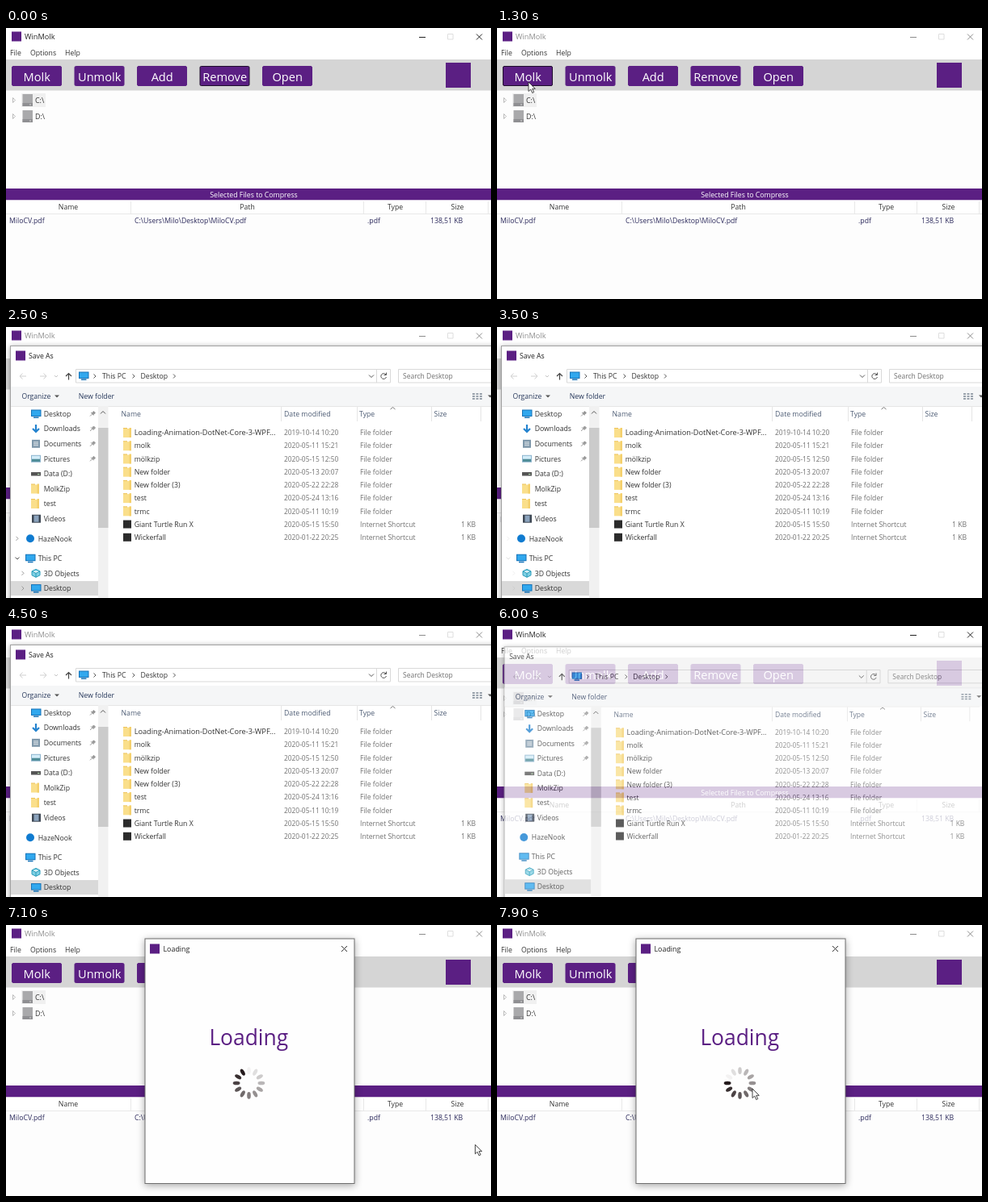
Recreate the animation shown at these times as an HTML page. Size 600 by 336 pixels, loop 8 s.

```html
<!DOCTYPE html>
<html lang="en">
<head>
<meta charset="utf-8">
<title>Save dialog</title>
<style>
html, body { margin: 0; width: 100%; height: 100%; overflow: hidden; background: #fff; }
svg { display: block; width: 600px; height: 336px; }
text { font-family: "Open Sans", "Noto Sans", sans-serif; white-space: pre; }
</style>
</head>
<body>
<svg id="stage" viewBox="0 0 600 336" xmlns="http://www.w3.org/2000/svg"></svg>
<script>
const LOOP = 8000;
const PURPLE = '#5b1f83';
const stage = document.getElementById('stage');

const rect = (x, y, w, h, fill, extra = '') =>
  `<rect x="${x}" y="${y}" width="${w}" height="${h}" fill="${fill}" ${extra}/>`;
const path = (d, stroke, width = 1, fill = 'none') =>
  `<path d="${d}" stroke="${stroke}" stroke-width="${width}" fill="${fill}"/>`;
const label = (x, y, s, size = 8.7, fill = '#333', extra = '') =>
  `<text x="${x}" y="${y}" font-size="${size}" fill="${fill}" ${extra}>${s}</text>`;
const centered = (x, y, s, size, fill) => label(x, y, s, size, fill, 'text-anchor="middle"');
const mark = (x, y) => rect(x, y, 12, 12, PURPLE);
const chevron = (x, y, color = '#555') => path(`M${x - 1.5} ${y - 2.5}l2.5 2.5l-2.5 2.5`, color);
const down = (x, y) => path(`M${x - 3} ${y - 1.5}h6l-3 3z`, 'none', 0, '#555');

function mainWindow() {
  const buttons = ['Molk', 'Unmolk', 'Add', 'Remove', 'Open'].map((name, i) => {
    const x = 7.5 + 77.5 * i;
    return rect(x, 47.5, 61, 24, PURPLE, `id="btn${name}" rx="1.5" stroke="${PURPLE}" stroke-width="1"`) +
      centered(x + 30.7, 66, name, 14.6, '#fff');
  }).join('');

  const drives = ['C:\\', 'D:\\'].map((name, i) => {
    const y = 89.5 + 20 * i;
    return path(`M8.5 ${y - 3}l3 3l-3 3z`, '#aaa', 0.8) +
      (i ? '' : rect(19, 81, 30, 17, '#f0f0f0')) +
      rect(20.5, y - 7.5, 12.5, 15, '#a9a9ab') + rect(20.5, y + 3.5, 12.5, 4, '#8f8f92') +
      rect(29, y + 5, 2, 1, '#d8d8d8') +
      label(36, y + 3.5, name, 8.9);
  }).join('');

  const heads = [[77, 'Name'], [298.5, 'Path'], [481.5, 'Type'], [558.5, 'Size']]
    .map(([x, s]) => centered(x, 225.3, s, 8.7, '#333')).join('');
  const cells = [[4, 'MiloCV.pdf'], [159, 'C:\\Users\\Milo\\Desktop\\MiloCV.pdf'], [447, '.pdf'], [525, '138,51 KB']]
    .map(([x, s]) => label(x, 241.5, s, 8.7, '#2c2a5c')).join('');

  return rect(0, 0, 600, 336, '#fdfdfd') + rect(0, 0, 600, 39, '#fff') +
    mark(7, 4.5) +
    `<g id="caption">${label(23, 14, 'WinMolk', 9.2, 'currentColor')}` +
    path('M511 11.5h8M582 7.5l7 7M589 7.5l-7 7', 'currentColor') + '</g>' +
    path('M546.5 7.5h6.5v6.5h-6.5z', '#dedede') +
    label(5, 34, 'File') + label(30, 34, 'Options') + label(73, 34, 'Help') +
    rect(0, 39, 600, 38.5, '#d5d5d5') + buttons +
    rect(544, 43, 31, 31, PURPLE) + drives +
    rect(0, 199, 600, 14.5, PURPLE) + centered(306.5, 210, 'Selected Files to Compress', 8.75, '#fff') +
    rect(0, 213.5, 600, 16.5, '#fff') +
    path('M0 230.5H600M154.5 215v15M442.5 215v15M519.5 215v15M596.5 215v15', '#e8e8e8') +
    heads + cells;
}

const folder = (x, y) =>
  rect(x, y - 6, 5, 3, '#eec35a') + rect(x, y - 5, 10, 11, '#fadf8b') + rect(x + 7.5, y - 6, 2.5, 12, '#f4d06d');
const screen = (x, y) =>
  rect(x, y - 5, 12.5, 8.5, '#1673b8') + rect(x + 1, y - 4, 10.5, 6.5, '#31a8ee') + rect(x + 3, y + 4, 6.5, 1.5, '#1673b8');
const disk = (x, y) => rect(x, y - 2, 12, 4.5, '#555') + rect(x + 8, y, 2.5, 1, '#b9e6b5');
const arrowDown = (x, y) => path(`M${x + 6} ${y - 5}v8M${x + 2} ${y}l4 4l4 -4`, '#2483cf', 2.2);
const sheet = (x, y) => rect(x + 1, y - 5, 10, 10, '#7e97aa') + path(`M${x + 3} ${y - 2}h6M${x + 3} ${y}h6M${x + 3} ${y + 2}h6`, '#fff', 0.8);
const picture = (x, y) => rect(x, y - 4.5, 12, 9, '#8db4ce') + rect(x + 1, y - 3.5, 10, 4, '#d3edf9') + rect(x + 1, y + 0.5, 10, 3, '#4d8c96');
const film = (x, y) => rect(x + 1, y - 5, 11, 10, '#3d4753') + rect(x + 3.5, y - 4, 6, 8, '#8ba3bd');
const cube = (x, y) => path(`M${x + 6} ${y - 5}l5 2.5v5l-5 2.5l-5 -2.5v-5zM${x + 1} ${y - 2.5}l5 2.5l5 -2.5M${x + 6} ${y}v5`, '#2a9cba', 1, '#7fd0e4');
const dot = (x, y) => `<circle cx="${x + 6}" cy="${y}" r="5" fill="#0f7bd0"/>`;

function sidePane() {
  const rows = [
    ['Desktop', 107.5, screen], ['Downloads', 126, arrowDown], ['Documents', 144.8, sheet],
    ['Pictures', 163.3, picture], ['Data (D:)', 182, disk], ['MolkZip', 200.5, folder],
    ['test', 219, folder], ['Videos', 237.7, film], ['HazeNook', 262.3, dot, 24],
    ['This PC', 286.7, screen, 24], ['3D Objects', 305.3, cube], ['Desktop', 324, screen]
  ];
  const pins = [107.5, 126, 144.8, 163.3]
    .map(y => path(`M104 ${y + 3}l3 -3M105 ${y - 1.5}l3.5 3.5M106.5 ${y - 1}l2 -2l2 2l-2 2z`, '#999', 1, '#999')).join('');
  return rect(6, 315, 108, 18, '#d9d9d9') +
    rows.map(([s, y, icon, x = 31]) => icon(x, y) + label(x + 15.7, y + 3.2, s)).join('') + pins +
    rect(114, 98, 12.5, 238, '#f1f1f1') + rect(114, 125, 12.5, 124, '#cbcbcb') +
    path('M117 107.5l3 -3l3 3', '#555') +
    '<g id="expanders">' +
    chevron(14, 262.3, '#999') + path('M11.5 285.5l2.5 2.5l2.5 -2.5', '#555') +
    chevron(21, 305.3, '#999') + chevron(21, 324, '#999') + '</g>';
}

function fileList() {
  const rows = [
    ['Loading-Animation-DotNet-Core-3-WPF...', '2019-10-14 10:20'],
    ['molk', '2020-05-11 15:21'], ['mölkzip', '2020-05-15 12:50'],
    ['New folder', '2020-05-13 20:07'], ['New folder (3)', '2020-05-22 22:28'],
    ['test', '2020-05-24 13:16'], ['trmc', '2020-05-11 10:19'],
    ['Giant Turtle Run X', '2020-05-15 15:50'], ['Wickerfall', '2020-01-22 20:25']
  ];
  const heads = [[142.5, 'Name'], [344, 'Date modified'], [437, 'Type'], [529.5, 'Size']]
    .map(([x, s]) => label(x, 111.3, s, 8.7, '#4d5c74')).join('');
  return heads + path('M340.5 99v18M434.5 99v18M526.5 99v18M587.5 99v18', '#e5e5e5') +
    path('M475.5 102l3 -2.5l3 2.5', '#777') +
    rows.map(([name, date], i) => {
      const y = 131 + 16.22 * i, game = i > 6;
      return (game ? rect(145, y - 5, 10, 10, '#2b2b2b') : folder(145, y)) +
        label(158.7, y + 3.2, name, i ? 8.7 : 9.2) +
        label(344, y + 3.2, date, 8.4, '#707070') +
        label(438, y + 3.2, game ? 'Internet Shortcut' : 'File folder', 8.6, '#707070') +
        (game ? label(581, y + 3.2, '1 KB', 8.6, '#707070', 'text-anchor="end"') : '');
    }).join('');
}

function saveDialog() {
  return rect(5.5, 23.5, 640, 330, '#fff', 'stroke="#a2a2a2" style="filter:drop-shadow(0 1px 3px rgba(0,0,0,.35))"') +
    `<g id="dlgMark">${mark(12, 29.5)}</g>` + label(28, 39, 'Save As', 8.7, '#222', 'id="dlgTitle"') +
    path('M25 61h-8M20.5 57.5l-3.5 3.5l3.5 3.5M42 61h8M46.5 57.5l3.5 3.5l-3.5 3.5', '#d0d0d0') +
    path('M60 60l2 2l2 -2', '#c4c4c4') +
    path('M77.5 65.5v-8M74 61l3.5 -3.5l3.5 3.5', '#444', 1.2) +
    path('M86.5 52.5h389v16.5h-389zM458.5 52.5v16.5M485.5 52.5h140v16.5h-140z', '#d9d9d9') +
    screen(90, 60.5) + chevron(110, 61) + label(119, 64, 'This PC') + chevron(158, 61) +
    label(166.5, 64, 'Desktop') + chevron(208.5, 61) + path('M449 59.5l3 3l3 -3', '#555') +
    path('M470 59a3.4 3.4 0 1 0 .5 3M470.5 56.5v3h-3', '#555') +
    label(491, 64, 'Search Desktop', 8.5, '#707070') +
    rect(6, 74, 600, 24, '#f5f6f7') + path('M6 98.5H600', '#e6e6e6') +
    label(19.5, 89.3, 'Organize', 8.6, '#28395c') + down(63, 86) + label(89.7, 89.3, 'New folder', 8.7, '#28395c') +
    path('M577 83h3M577 86h3M577 89h3M581.5 83h3M581.5 86h3M581.5 89h3M586 83h3M586 86h3M586 89h3', '#7b8794', 1.5) +
    down(599, 86) + sidePane() + fileList();
}

function loadingDialog() {
  let dots = '';
  for (let i = 0; i < 12; i++)
    dots += `<ellipse class="dot" cx="300.5" cy="180.6" rx="2.3" ry="4.4" transform="rotate(${i * 30} 300.5 196)" fill="#251b1d"/>`;
  return rect(172, 17, 259, 303.5, '#fefefe', 'stroke="#6f6f6f" style="filter:drop-shadow(0 2px 5px rgba(0,0,0,.35))"') +
    mark(178, 23.5) + label(194.5, 33, 'Loading', 8.9, '#222') +
    path('M415 26l7 7M422 26l-7 7', '#333') +
    centered(300.3, 148.5, 'Loading', 26.4, PURPLE) + dots;
}

stage.innerHTML = `<g id="main">${mainWindow()}</g><g id="save">${saveDialog()}</g>` +
  `<g id="loading">${loadingDialog()}</g>` +
  `<g id="cursor">${path('M0 0v11.5l2.7 -2.5l2 4.5l2 -.9l-2 -4.3h3.6z', '#333', 0.9, '#fff')}</g>`;

const el = id => document.getElementById(id);
const [caption, save, loading, cursor, expanders, dlgMark, dlgTitle, btnMolk, btnRemove] =
  ['caption', 'save', 'loading', 'cursor', 'expanders', 'dlgMark', 'dlgTitle', 'btnMolk', 'btnRemove'].map(el);
const dots = [...document.querySelectorAll('.dot')];

const ramp = (t, a, b) => Math.min(1, Math.max(0, (t - a) / (b - a)));
const ease = p => p * p * (3 - 2 * p);
const show = (node, opacity) => {
  node.setAttribute('opacity', opacity);
  node.setAttribute('visibility', opacity > 0 ? 'inherit' : 'hidden');
};
const scaleAt = (node, x, y, s) =>
  node.setAttribute('transform', `translate(${x * (1 - s)} ${y * (1 - s)}) scale(${s})`);
const focus = (button, on) => button.setAttribute('stroke', on ? '#1f0d2c' : PURPLE);

// Cursor trips: start, stop, hide time, from x, y, to x, y
const trips = [
  [300, 1000, 1500, 290, 336, 39, 67],
  [1500, 2200, 2200, 39, 67, 100, 340],
  [7000, 7600, LOOP, 602, 278, 316, 203]
];

function draw(t) {
  const active = t < 1200 || (t >= 5900 && t < 6150);
  caption.setAttribute('color', active ? '#222' : '#8c8c8c');
  focus(btnRemove, t < 1200);
  focus(btnMolk, t >= 1200 && t < 5900);

  const closing = ramp(t, 5930, 6230);
  const shown = ramp(t, 1400, 1600) * (1 - closing);
  show(save, shown);
  scaleAt(save, 337, 240, 0.955 + 0.045 * shown);
  show(dlgMark, closing > 0 ? 0 : 1);
  dlgTitle.setAttribute('x', closing > 0 ? 11.7 : 28);
  expanders.setAttribute('opacity', 1 - ramp(t, 3000, 3600));

  const opened = ramp(t, 6120, 6290);
  show(loading, opened);
  scaleAt(loading, 301, 168, 0.94 + 0.06 * opened);
  const head = Math.floor((t - 6300) * 0.012 + 2.2);
  dots.forEach((d, i) => {
    const age = (((head - i) % 12) + 12) % 12;
    d.setAttribute('opacity', 1 - age / 11.6);
  });

  const trip = trips.find(([start, , end]) => t >= start && t < end);
  show(cursor, trip ? 1 : 0);
  if (trip) {
    const [start, stop, , x0, y0, x1, y1] = trip;
    const p = ease(ramp(t, start, stop));
    cursor.setAttribute('transform', `translate(${x0 + (x1 - x0) * p} ${y0 + (y1 - y0) * p})`);
  }
}

const begin = performance.now();
function tick() {
  draw((performance.now() - begin) % LOOP);
  requestAnimationFrame(tick);
}
tick();
</script>
</body>
</html>
```
